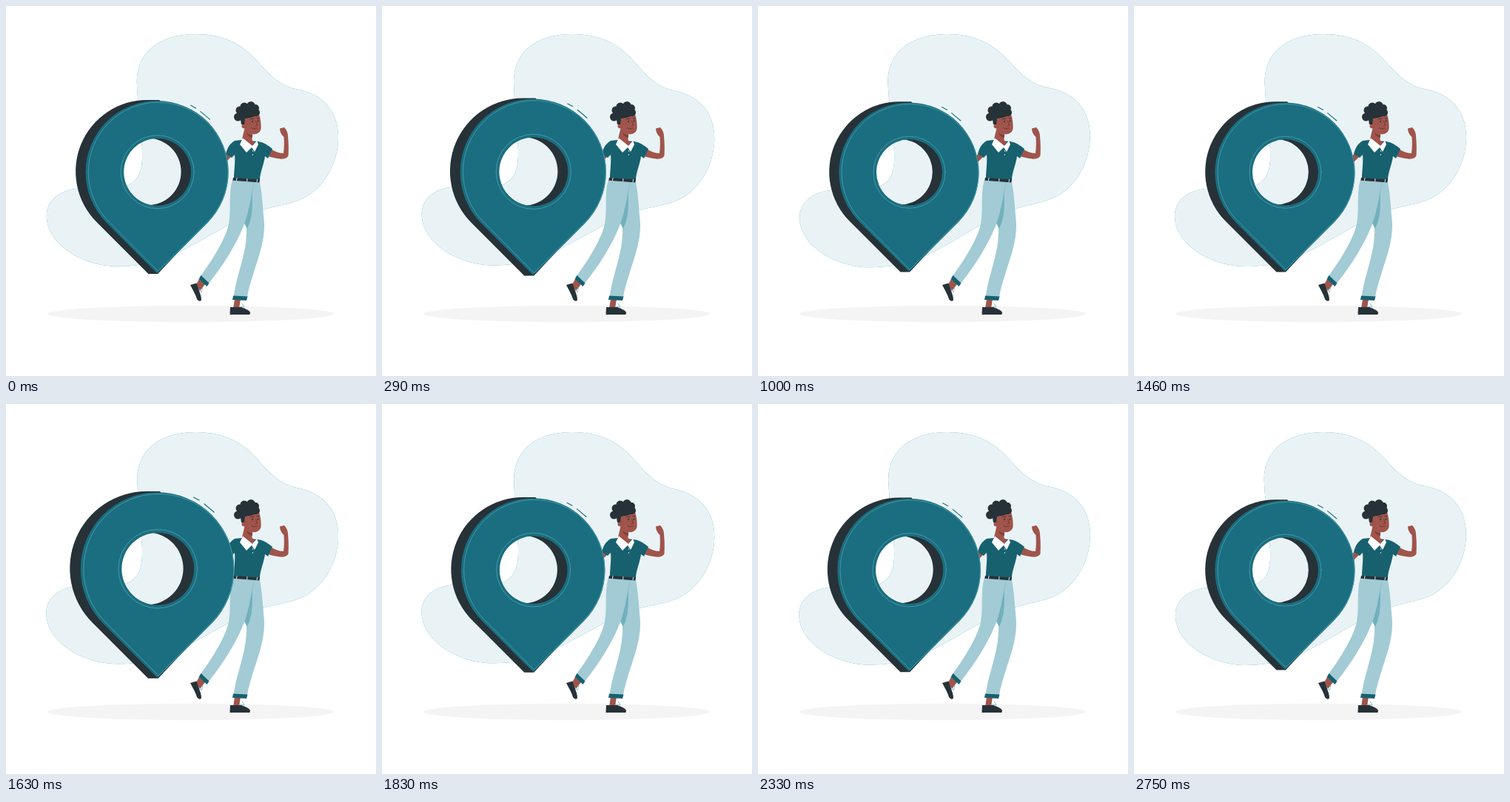
Recreate the animation shown at these times as an HTML page. Size 500 px wide and 500 px high, loop 2790 ms.

```html
<!DOCTYPE html>
<html lang="en">
<head>
<meta charset="utf-8">
<title>Location pin</title>
<style>
  html, body { margin: 0; width: 100%; height: 100%; overflow: hidden; background: #fff; }
  svg { display: block; width: 100%; height: 100%; }
  .teal { fill: #1a6e7f; }
  .shirt { fill: #17616f; }
  .dark { fill: #263238; }
  .skin { fill: #a0544b; }
  .denim { fill: #a2cbd5; }
  .white { fill: #fff; }
  .line { fill: none; stroke-linecap: round; stroke-linejoin: round; }
</style>
</head>
<body>
<svg viewBox="0 0 500 500">
  <defs>
    <path id="blobShape" d="M177 110C173 64 206 38 256 38C299 38 322 55 340 75C358 95 370 107 392 112C426 118 449 140 449 177C449 216 426 253 391 264C369 271 343 273 315 288C291 301 266 316 243 328C216 343 188 352 151 352C104 352 55 322 55 284C55 260 77 247 104 246.500C136 246 158 250 173 237C187 225 185 198 182 174C180 151 178 130 177 110Z"/>
  </defs>

  <g id="blob">
    <use href="#blobShape" fill="#1a8a9f"/>
    <use href="#blobShape" class="white" opacity=".9"/>
  </g>

  <ellipse cx="249.500" cy="416" rx="193.500" ry="11.200" fill="#f4f4f4"/>

  <g id="person">
    <!-- legs and shoes -->
    <path class="skin" d="M261 369L269 376L262 385L256 378ZM309 396H317L315 409H307Z"/>
    <path class="dark" d="M249 377L257.500 374.500L260 382C262 388 264 392 264 397C263 400 260 399 258 396C256 389 252 383 249 377ZM303 407H318C323 409 329 411 330 414L329.500 417H302.500Z"/>
    <path class="line" stroke="#72b0bd" stroke-width=".8" d="M266 380L264 387L261 383M319 402L322 407L316 406"/>
    <path class="denim" d="M322 237L343 238C346 253 347 270 349 294C350 327 333 357 326 393L308 392C311 364 326 334 325 301Z"/>
    <path fill="#72b0bd" d="M332 246C334 267 333 287 326 301L320 290Z"/>
    <path class="denim" d="M306 235L335 237C332 252 330 268 326 282C319 310 296 348 273 376L262 366C277 346 292 322 299 302C305 284 301 264 304 243Z"/>
    <path class="line" stroke="#86b9c5" stroke-width=".6" d="M335 238C334 246 332 255 331 262"/>
    <path class="shirt" d="M263.500 364L274.500 374.500L271.500 379L260.500 369ZM307 391.500L326.500 392.500L325 398L306 397Z"/>

    <!-- arms, torso and belt -->
    <path class="skin" d="M298 199L305 203L297 211L291 208ZM359 194C364 197 370 199 375 199C376 192 376 184 375.500 177C372 174 370 170 370 165.500L376 164C379 167 381 171 381 176C382 186 382 195 381.500 202C379 209 367 207 354 203Z"/>
    <path class="shirt" d="M319 181L309 182C301 187 299 193 297 200L305 205L309 201C310 212 308 223 308 233L343 236C343 225 349 213 350 203L354 206L360 193C354 188 348 184 340 183Z"/>
    <path class="dark" d="M307 232L343 234.500L342.500 238.500L306.300 235.800Z"/>
    <path class="line" stroke="#dcebee" d="M312 232.500L311.500 236M326 233.500L325.700 237M339.500 234.500L339 238"/>

    <!-- neck, collar and head -->
    <path class="skin" d="M323 163L333 171L332.500 181L336 184L333 191L319 180Z"/>
    <path fill="#7d3f38" d="M325 171C328 174 331 175 333 174L332.700 178C329 177 326 175 325 171Z"/>
    <path class="white" d="M320 178.500L316 187L325 198L332 191L336 197L341 187L339 182L333 189Z"/>
    <path class="line" stroke="#fff" stroke-width="1.400" d="M333.500 196V196.100M333.500 201V201.100"/>
    <path class="skin" d="M322 147L342 146C344 152 345 160 344.500 166C343 173 336 174 331 173C326 171 323 166 322 160Z"/>
    <circle class="skin" cx="322" cy="162" r="3.500"/>
    <g class="dark">
      <circle cx="316" cy="141" r="5.500"/><circle cx="322" cy="136" r="5.500"/>
      <circle cx="331" cy="134.500" r="5.500"/><circle cx="337" cy="138" r="5"/>
      <circle cx="338" cy="144" r="5"/><circle cx="313.500" cy="150" r="5.500"/>
      <circle cx="328" cy="142" r="9"/>
      <path d="M315 142L340 142L342 147L330 151L323 152L322 160L318 160Z"/>
      <ellipse cx="333" cy="156" rx=".8" ry="1.200"/><ellipse cx="340.500" cy="155.500" rx=".8" ry="1.200"/>
    </g>
    <path class="line" stroke="#263238" stroke-width=".8" d="M330.500 153L334.500 152M339 151.500L342 152"/>
    <path class="line" stroke="#64312c" stroke-width=".8" d="M337.500 156L339.500 161L337.500 162M332 165Q336 167 339 165"/>
  </g>

  <g id="pin">
    <path class="dark" fill-rule="evenodd" d="M124 291A94.700 94.700 0 0 1 191 129.300H207L270 200V290L205 359.500H192.500ZM147 224.300a44.400 44.400 0 1 0 88.800 0a44.400 44.400 0 1 0 -88.800 0Z"/>
    <path class="teal" fill-rule="evenodd" d="M137.100 291.900A94.600 94.600 0 1 1 270.900 291.900L204 358.800ZM160 224.800a44.500 44.500 0 1 0 89 0a44.500 44.500 0 1 0 -89 0Z"/>
    <g class="line" stroke="#4fa0b1" stroke-width=".8">
      <path d="M140.100 290.400A92.500 92.500 0 1 1 270.900 290.400L205.500 355.800Z"/>
      <circle cx="204.500" cy="224.700" r="48.500"/>
    </g>
    <path class="line" stroke="#1a6e7f" stroke-width="1.100" d="M248.600 136.600L255.400 140.200M261.600 144.700L273.900 155"/>
  </g>
</svg>
<script>
  const LOOP = 2790, FRAME = 1000 / 24, PERIOD = 1500, LEAD = 31;
  const blob = document.getElementById('blob');
  const pin = document.getElementById('pin');

  // Linear interpolation through [phase, value] stops.
  function tween(stops, p) {
    const i = stops.findIndex(s => s[0] > p);
    const [p0, v0] = stops[i - 1], [p1, v1] = stops[i];
    return v0 + (v1 - v0) * (p - p0) / (p1 - p0);
  }

  const sway = [[0, 0], [.25, 1], [.75, -1], [1, 0]];
  const heartbeat = [[0, 1], [.1, 1.1], [.3, 1], [.4, 1], [.5, 1.1], [.6, 1], [1, 1]];

  function draw(now) {
    // The picture advances in steps of 24 per second.
    const time = Math.floor((now % LOOP + 6) / FRAME) * FRAME;
    const phase = (time + LEAD) % PERIOD / PERIOD;
    blob.setAttribute('transform', `rotate(${tween(sway, phase)} 252 195)`);
    pin.setAttribute('transform',
      `translate(197.5 244.5) scale(${tween(heartbeat, phase)}) translate(-197.5 -244.5)`);
  }

  const start = performance.now();
  function tick() {
    draw(performance.now() - start);
    requestAnimationFrame(tick);
  }
  draw(0);
  requestAnimationFrame(tick);
</script>
</body>
</html>
```
